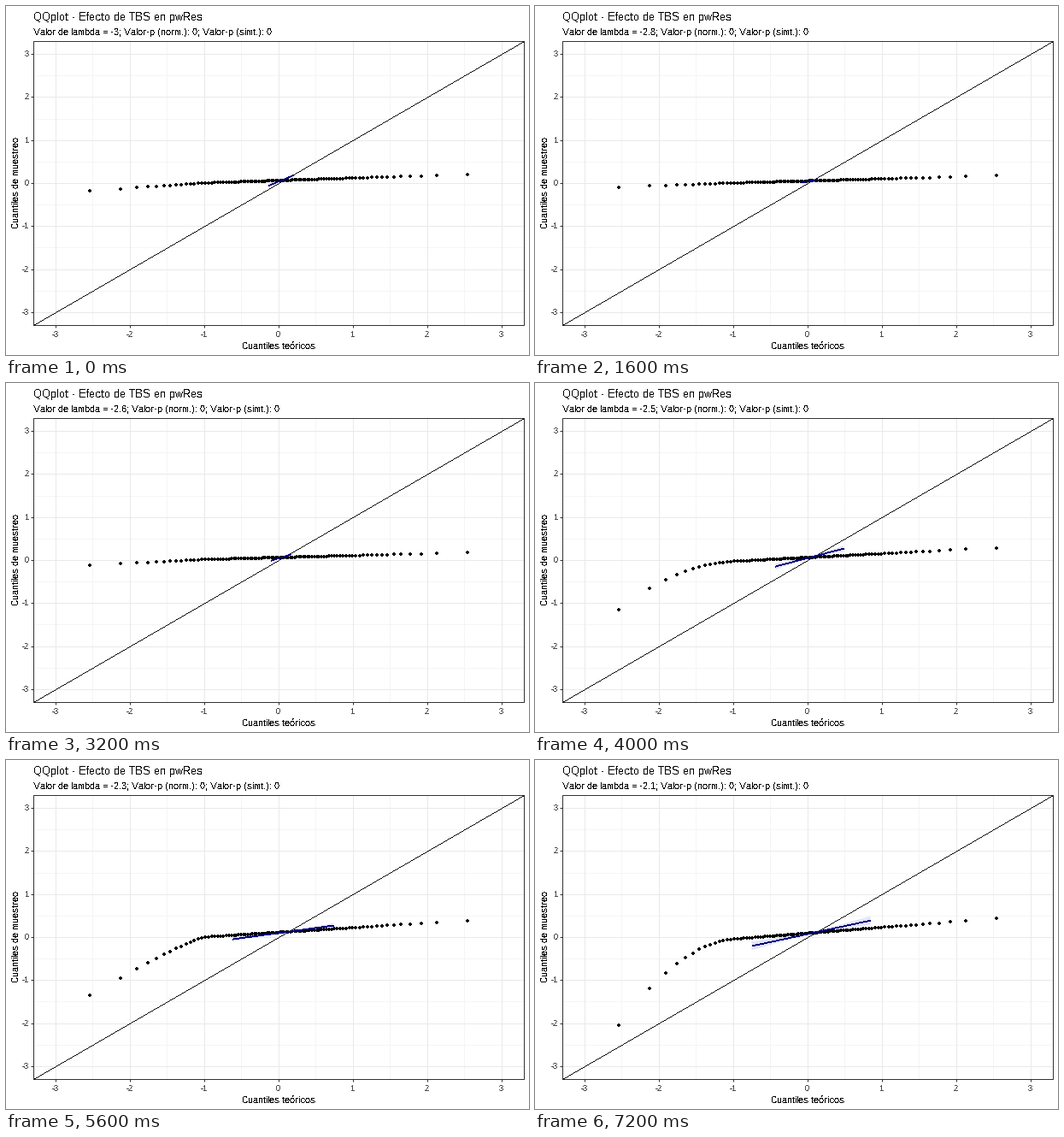
A matplotlib script that plays this animation: 612x408 px, repeating every 8 s.

```python
import math

import matplotlib.pyplot as plt
import numpy as np
from matplotlib.animation import FuncAnimation
from matplotlib.collections import PolyCollection
from matplotlib.patches import Rectangle

W, H, DPI = 612, 408, 96
PX = 72 / DPI                       # one pixel in points
LEFT, RIGHT, TOP, BOTTOM = 32, 606, 41, 373
N = 90

plt.rcParams.update({
    "font.family": "Liberation Sans",
    "text.hinting": "native",
    "text.hinting_factor": 1,
    "text.antialiased": False,
})


def to_x(v):
    return 319.3 + 87 * v


def to_y(v):
    return 207.5 - 50.33 * v


def normal_quantiles(n):
    grid = np.linspace(-4, 4, 4001)
    cdf = [0.5 * (1 + math.erf(v / math.sqrt(2))) for v in grid]
    return np.interp((np.arange(n) + 0.5) / n, cdf, grid)


z = normal_quantiles(N)
point_x = np.round(to_x(z))
tail = np.clip((-z - 1) / (-z[0] - 1), 0, 1)    # 0 in the bulk, 1 at the lowest point


def sample(mid, slope, drop, power):
    """Pixel heights: a straight bulk with a left tail that falls by `drop`."""
    return np.round(mid - slope * z + drop * tail ** power)


def fit(mid, reach, rise):
    """End points of the fitted line, centred near the sample's middle."""
    cx = 317 + 1.2 * (207.5 - mid)
    return cx - reach, mid + rise, cx + reach, mid - rise


# (mid, slope, drop, power) of the sample and (reach, rise) of the fitted line,
# for lambda = -3, -2.9, ...
STEPS = [
    ((204, 2.8, 5, 1), (14.5, 6)),
    ((204, 4, 36, 2), (34, 10)),
    ((204.5, 2.4, 1, 1), (9, 1.8)),
    ((204.3, 2.5, 1.5, 1), (10, 3)),
    ((204, 2.3, 3.5, 1), (11.5, 3.8)),
    ((204, 4.5, 49.6, 2), (40, 10.5)),
    ((204, 5.5, 86, 2.5), (59.5, 15.5)),
    ((201.5, 5.5, 60, 1.2), (59, 8)),
    ((205, 8.5, 24.4, 1), (49.5, 18.3)),
    ((202.5, 6.8, 90, 1.9), (69.5, 14.8)),
]


def stairs(x0, y0, x1, y1, width):
    """Outline of a line made of whole pixels, `width` rows per column."""
    cols = np.arange(round(x0), round(x1) + 1)
    rows = np.floor(np.linspace(y0, y1, len(cols)) + 0.5) - width // 2
    xs = np.column_stack([cols, cols + 1]).ravel()
    ys = np.repeat(rows, 2)
    return np.column_stack([np.r_[xs, xs[::-1]],
                            np.r_[ys, ys[::-1] + width]])


# Dot of 4 by 4 pixels without its corners
quarter = np.array([(2, -1), (2, 1), (1, 1)])
turn = np.array([(0, 1), (-1, 0)])
DOT = np.vstack([quarter @ np.linalg.matrix_power(turn, k) for k in range(4)])

fig = plt.figure(figsize=(W / DPI, H / DPI), dpi=DPI, facecolor="white")
ax = fig.add_axes([0, 0, 1, 1])
ax.set(xlim=(0, W), ylim=(H, 0))
ax.axis("off")


def stroke(xs, ys, color, order):
    ax.plot(xs, ys, color=color, lw=PX, zorder=order, solid_capstyle="butt")


def label(x, y, text, size, color="black", **kw):
    return ax.text(x, y, text, fontsize=size * PX, color=color,
                   va="baseline", **kw)


def shape(color, order, **kw):
    poly, = ax.fill([0, 0, 0], [0, 0, 0], color=color, lw=0, zorder=order, **kw)
    return poly


def grid_lines(v, color, order):
    x, y = math.floor(to_x(v)), math.floor(to_y(v))
    stroke([x, x], [TOP, BOTTOM], color, order)
    stroke([LEFT, RIGHT], [y, y], color, order)
    return x, y


for v in np.arange(-2.5, 3):
    grid_lines(v, "#f5f5f5", 0)
for v in range(-3, 4):
    x, y = grid_lines(v, "#e9e9e9", 1)
    stroke([x, x], [BOTTOM, BOTTOM + 3], "#333333", 1)
    stroke([LEFT - 3, LEFT], [y, y], "#333333", 1)
    label(x - 0.5, 387, str(v), 9, "#4d4d4d", ha="center")
    label(27, y + 3, str(v), 9, "#4d4d4d", ha="right")

shape("black", 2).set_xy(stairs(LEFT, BOTTOM, RIGHT, TOP, 1))
ax.add_patch(Rectangle((LEFT, TOP), RIGHT - LEFT, BOTTOM - TOP, fill=False,
                       ec="#333333", lw=PX, zorder=7))

label(32, 17, "QQplot - Efecto de TBS en pwRes", 13)
subtitle = label(32, 34, "", 11)
label(319, 401, "Cuantiles teóricos", 11, ha="center")
label(15, 207, "Cuantiles de muestreo", 11, ha="center",
      rotation=90, rotation_mode="anchor")

dots = PolyCollection([DOT], facecolor="black", linewidth=0, zorder=3)
ax.add_collection(dots, autolim=False)
ribbon = shape("#0000cd", 4, alpha=0.11)
fit_line = shape("#000080", 5)


def draw(i):
    curve, line = STEPS[i]
    p = "0.001" if i == 8 else "0"
    subtitle.set_text(f"Valor de lambda = {-3 + i / 10:g}; "
                      f"Valor-p (norm.): {p}; Valor-p (simt.): {p}")
    centres = np.column_stack([point_x, sample(*curve)])
    dots.set_verts([DOT + c for c in centres])

    x0, y0, x1, y1 = fit(curve[0], *line)
    fit_line.set_xy(stairs(x0, y0, x1, y1, 2))
    u = np.linspace(-1, 1, 41)
    xs, mid = np.linspace(x0, x1, 41), np.linspace(y0, y1, 41)
    half = line[1] / 3 * np.sqrt(0.1 + 0.9 * u ** 2)
    ribbon.set_xy(np.column_stack([np.r_[xs, xs[::-1]],
                                   np.r_[mid - half, (mid + half)[::-1]]]))
    return subtitle, dots, ribbon, fit_line


anim = FuncAnimation(fig, draw, frames=len(STEPS), interval=800,
                     repeat=True, repeat_delay=0)
plt.show()
```
